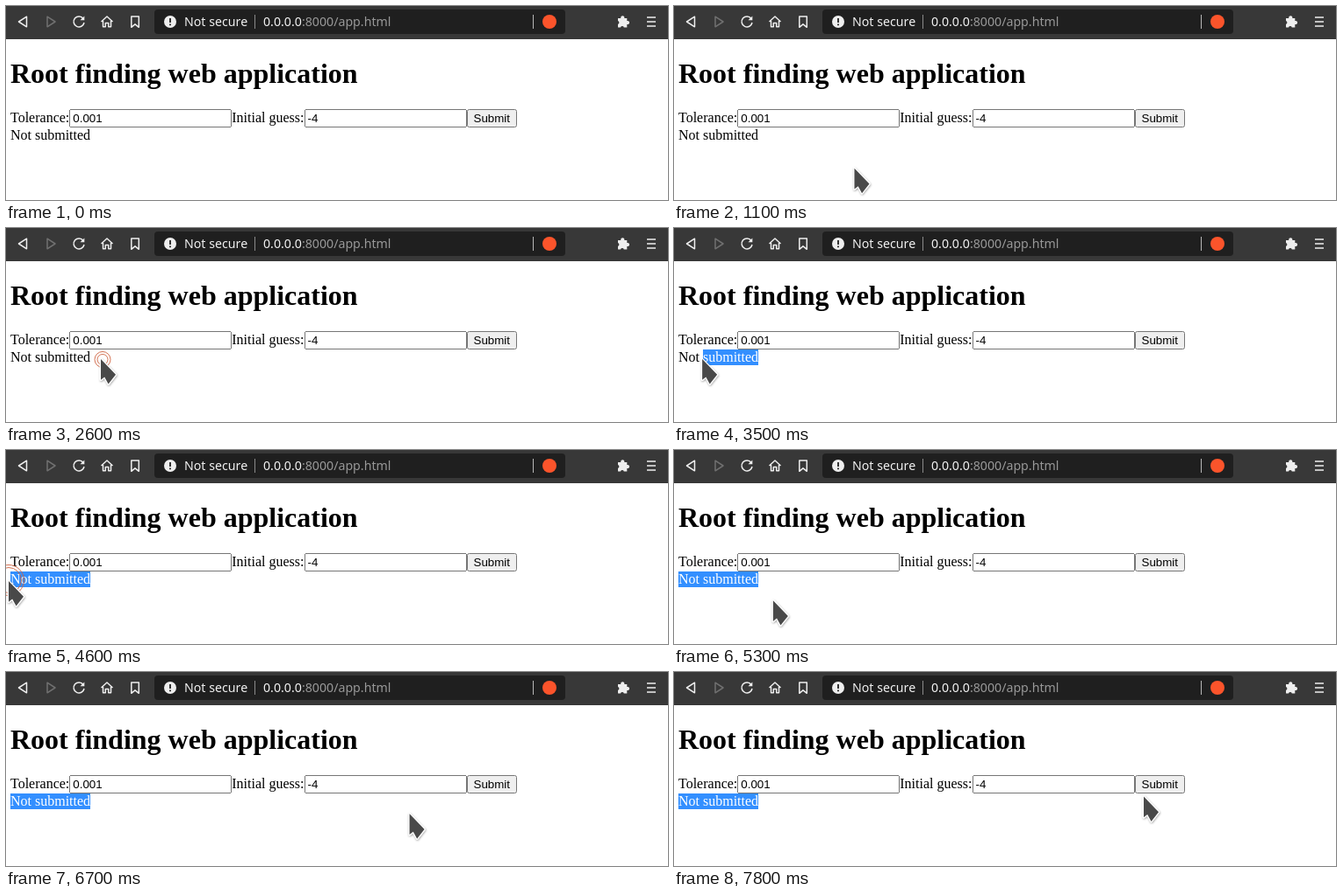
These frames come from a looping animation (754x222 px, 8000 ms). An HTML page:

```html
<!DOCTYPE html>
<html lang="en">
<head>
<meta charset="utf-8">
<title>Root finding web application</title>
<style>
  html, body { margin: 0; width: 100%; height: 100%; overflow: hidden; background: #fff; }
  svg, #page, .bar { position: absolute; left: 0; top: 0; }
  .bar { top: 8px; font: 14.2px/20px "Noto Sans", sans-serif; color: #f1f1f1; white-space: pre; }
  .bar i { font-style: normal; color: #989898; }
  .icon { fill: none; stroke: #eee; stroke-width: 1.5; stroke-linejoin: round; }
  .icon .solid { fill: #eee; stroke: none; }
  .icon .dim { stroke: #707070; }
  #page {
    display: flow-root; left: 5px; top: 38px; pointer-events: none;
    font: 16px "Liberation Serif", serif; color: #000; white-space: pre;
  }
  h1 { font-size: 32px; margin: .67em 0; }
  input, button { font: 13.3333px "Liberation Sans", sans-serif; margin: 0; }
  input { box-sizing: border-box; width: 185px; }
  mark { display: inline-block; background: #338fff; color: #fff; }
  .ring { fill: none; stroke: #cf6240; stroke-width: .9; }
</style>
</head>
<body>
<svg width="754" height="38">
  <rect width="754" height="38" fill="#383838"/>
  <rect x="169" y="4" width="468" height="28" rx="4" fill="#1f1f1f"/>
  <g class="icon">
    <path d="M14.5 18 L23.5 12.2 V23.8 Z"/>
    <path class="dim" d="M56 18 L47 12.2 V23.8 Z"/>
    <path d="M88 14.5 A6 6 0 1 0 89 19"/>
    <path class="solid" d="M89.3 11.5 V16.3 H84.5 Z"/>
    <path d="M108.5 18 L115 12 L121.5 18 M110.5 17 V23.8 H113.3 V19.5 H116.7 V23.8 H119.5 V17"/>
    <path d="M142.8 12 H151.3 V24.3 L147 20.8 L142.8 24.3 Z"/>
    <path d="M730 13 H740 M730 18 H740 M730 23 H740"/>
    <path class="solid" d="M697 14 H700.3 A2.1 2.1 0 1 1 704.3 14 H707.3 V17 A2.1 2.1 0 1 1 707.3 21 V24.5 H703.8 A2 2 0 0 0 700 24.5 H697 V20.8 A2 2 0 0 0 697 17 Z"/>
    <circle class="solid" cx="187" cy="18" r="7"/>
  </g>
  <path d="M187 14 V19 M187 20.5 V22.3" stroke="#1f1f1f" stroke-width="1.8"/>
  <path d="M283.5 10 V26" stroke="#8a8a8a"/>
  <path d="M600.5 10 V26" stroke="#b8b8b8"/>
  <circle cx="619" cy="18" r="8" fill="#fb542b"/>
</svg>
<div class="bar" style="left:203px">Not secure</div>
<div class="bar" style="left:293px">0.0.0.0<i>:8000/app.html</i></div>

<div id="page"><h1>Root finding web application</h1><div>Tolerance:<input value="0.001" readonly tabindex="-1">Initial guess:<input value="-4" readonly tabindex="-1"><button tabindex="-1">Submit</button></div><div><span id="plain">Not submitted</span><mark id="marked"></mark></div></div>

<svg width="754" height="222">
  <filter id="shade" x="-50%" y="-50%" width="200%" height="200%">
    <feDropShadow dx="0.5" dy="1" stdDeviation="1.1" flood-color="#000" flood-opacity=".4"/>
  </filter>
  <g id="rings">
    <circle class="ring"/>
    <circle class="ring"/>
  </g>
  <path id="cursor" d="M0 0 V23.8 L4.2 20.4 L8.6 28.4 L17 17.8 Z" fill="#484848"
    stroke="#fff" stroke-width="2.4" stroke-linejoin="round" paint-order="stroke" filter="url(#shade)"/>
</svg>
<script>
const LOOP = 8000, STEP = 100;
const LABEL = "Not submitted", LEFT = 5, CHAR = 7;
const $ = id => document.getElementById(id);

const easeIn = e => u => u ** e;
const easeOut = e => u => 1 - (1 - u) ** e;

// Strokes of the hand, each with its own easing across and down
const moves = [
  { start: 700, end: 2300, from: [257, 207], to: [110, 152], ease: [easeOut(1.5), easeOut(1.7)] },
  { start: 2600, end: 4300, from: [108, 150], to: [3, 150], ease: [easeOut(1.7), easeOut(1)] },
  { start: 4600, end: 5900, from: [3, 150], to: [310, 185], ease: [easeIn(1.66), easeOut(1.3)] },
  { start: 5900, end: 7800, from: [310, 185], to: [535, 142.5], ease: [easeOut(2), easeOut(1.4)] }
];

// Press and release rings: radius r, widened by grow after each hold
const press = { at: 2600, hold: 200, x: 110, y: 150.5, r: 9, grow: 9 };
const release = { at: 4300, hold: 300, x: 3, y: 149, r: 16.5, grow: 1 };

function pointerAt(t) {
  const move = moves.findLast(m => t >= m.start);
  if (!move) return null;
  const { start, end, from, to, ease } = move;
  const u = Math.min(1, (t - start) / (end - start));
  return from.map((a, i) => a + (to[i] - a) * ease[i](u));
}

function drawSelection(t, pointer) {
  let split = LABEL.length;
  if (t >= release.at) split = 0;
  else if (t > press.at) split = Math.min(split, Math.round((pointer[0] - LEFT) / CHAR));
  $("plain").textContent = LABEL.slice(0, split);
  $("marked").textContent = LABEL.slice(split);
}

function drawRings(t) {
  const click = [press, release].find(c => t >= c.at && t < c.at + c.hold + STEP);
  $("rings").style.display = click ? "" : "none";
  if (!click) return;
  const r = click.r + click.grow * Math.floor((t - click.at) / click.hold);
  [...$("rings").children].forEach((ring, i) => {
    ring.setAttribute("cx", click.x);
    ring.setAttribute("cy", click.y);
    ring.setAttribute("r", r - 3 * i);
  });
}

function draw(now) {
  const t = Math.floor(now % LOOP / STEP) * STEP;
  const pointer = pointerAt(t);
  $("cursor").style.display = pointer ? "" : "none";
  if (pointer) $("cursor").setAttribute("transform", `translate(${pointer})`);
  drawSelection(t, pointer);
  drawRings(t);
}

const begin = performance.now();
function tick() {
  draw(performance.now() - begin);
  requestAnimationFrame(tick);
}
tick();
</script>
</body>
</html>
```
